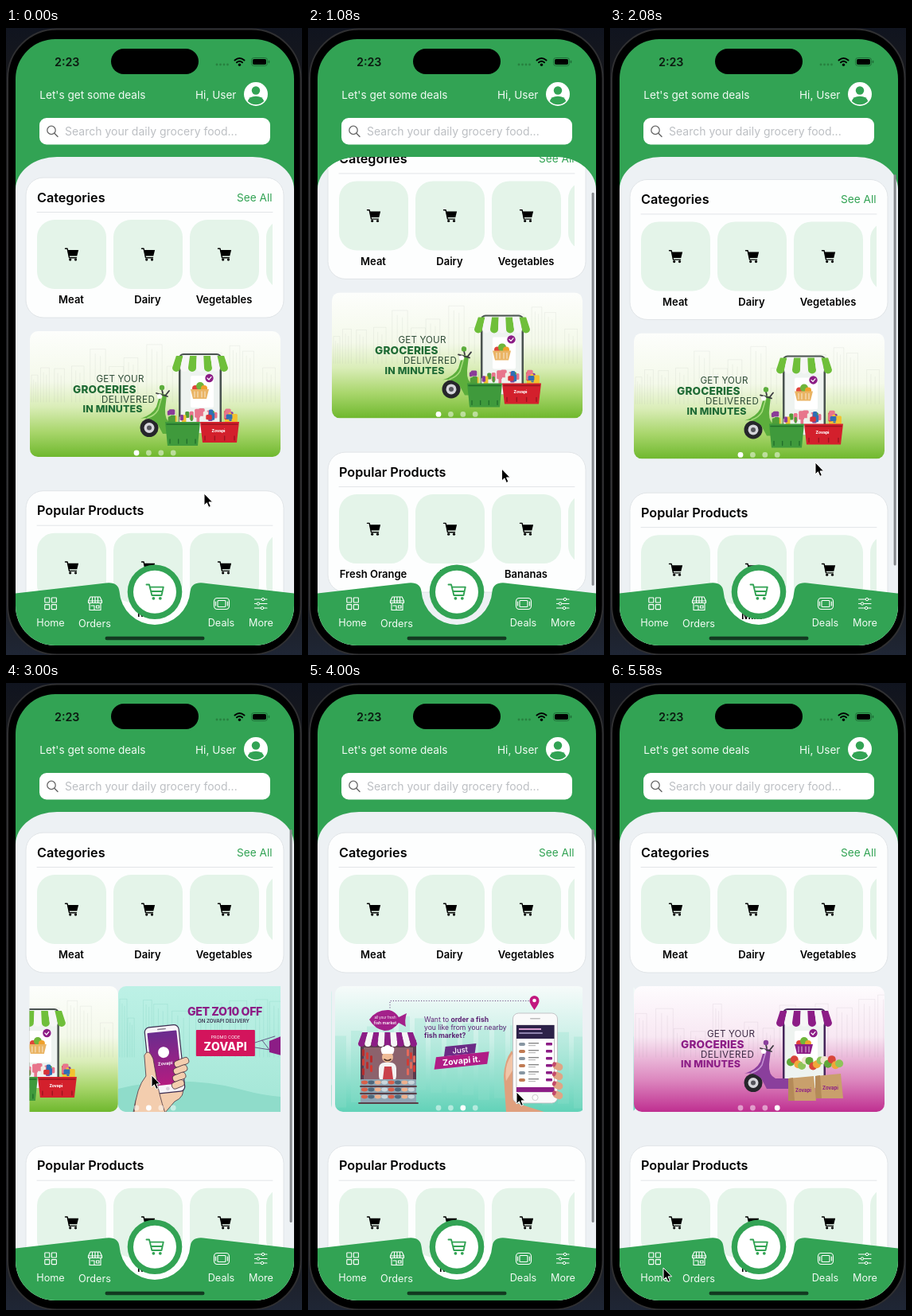
These frames come from a looping animation (372x788 px, 5.66 s). An HTML page:

```html
<!DOCTYPE html>
<html lang="en">
<head>
<meta charset="utf-8">
<title>Grocery app</title>
<style>
html, body { margin: 0; width: 100%; height: 100%; overflow: hidden; background: #000; }
svg { display: block; width: 372px; height: 788px; }
text { font-family: Inter, sans-serif; white-space: pre; }
</style>
</head>
<body>
<svg id="stage" viewBox="0 0 372 788"></svg>
<script>
const GREEN = '#32a354', PURPLE = '#8c1d86', PINK = '#c2187f';
const LOOP = 5660, STEP = 1000 / 12;

let seed = 7;
const rnd = () => (seed = seed * 16807 % 2147483647) / 2147483647;
const range = (n, f) => Array.from({ length: n }, (_, i) => f(i)).join('');

const text = (x, y, size, str, attr = '') => `<text x="${x}" y="${y}" font-size="${size}" ${attr}>${str}</text>`;
const mid = (x, y, size, str, attr = '') => text(x, y, size, str, 'text-anchor="middle" ' + attr);
const rect = (x, y, w, h, r, fill, attr = '') => `<rect x="${x}" y="${y}" width="${w}" height="${h}" rx="${r}" fill="${fill}" ${attr}/>`;
const dot = (x, y, r, fill, attr = '') => `<circle cx="${x}" cy="${y}" r="${r}" fill="${fill}" ${attr}/>`;
const path = (d, fill, attr = '') => `<path d="${d}" fill="${fill}" ${attr}/>`;
const line = (d, color, w = 1, attr = '') => path(d, 'none', `stroke="${color}" stroke-width="${w}" stroke-linecap="round" stroke-linejoin="round" ${attr}`);
const at = (x, y, body, attr = '') => `<g transform="translate(${x} ${y})" ${attr}>${body}</g>`;
const gradient = (id, ...stops) => `<linearGradient id="${id}" x2="0" y2="1">${stops.map(([o, c]) => `<stop offset="${o}" stop-color="${c}"/>`).join('')}</linearGradient>`;

// ---- product cards
const cart = line('M-8 -7.2H-5.4L-3 4.2H6', '#000', 1.4) + path('M-5.2 -5.4H8.6L6.8 2H-3.6z', '#000') +
  dot(-1.8, 6.6, 1.6, '#000') + dot(5, 6.6, 1.6, '#000');

function card(y, title, labels, extra = '') {
  return at(0, y,
    rect(25, 0, 324, 176, 22, '#fdfefe', 'stroke="#e0e4e7"') +
    text(39, 30.8, 16.2, title, 'font-weight="600"') + extra +
    line('M39 43.5H335', '#e2e5e8') +
    `<g clip-path="url(#row)">` + range(4, i => at(82.5 + 96 * i, 0,
      rect(-43.5, 53, 87, 87, 22, '#e4f4e9') + at(0, 96.5, cart) +
      mid(-.5, 158.4, 13, labels[i] || '', 'font-weight="600"'))) + '</g>');
}

// ---- banner parts
function skyline(color, opacity) {
  let d = '';
  for (let x = 32; x < 340;) {
    const w = 8 + rnd() * 14, top = 392 + rnd() * 48;
    d += `M${x} 470V${top}h${w}V470M${x + w / 3} 470V${top + 6}M${x + w / 1.5} 470V${top + 9}`;
    x += w + rnd() * 12;
  }
  return line(d, color, .6, `opacity="${opacity}"`);
}

function awning(x, y, w, h, n, color) {
  const s = w / n, cx = x + w / 2, pull = v => cx + (v - cx) * .86;
  return range(n, i => {
    const a = x + i * s, b = a + s;
    return path(`M${pull(a)} ${y}H${pull(b)}L${b} ${y + h}A${s / 2} ${s / 2} 0 0 1 ${a} ${y + h}z`, i % 2 ? '#f6f6f6' : color);
  });
}

const shop = (color, dark) =>
  rect(217, 409, 54, 100, 6, dark) + rect(219.5, 411, 49, 98, 4, '#eef3f0') +
  awning(209, 412, 70, 15, 7, color) +
  rect(232, 437, 29, 40, 2, '#fff') +
  dot(238, 453, 4, '#e0453a') + dot(244, 450, 5, '#6fb53a') + dot(249, 453, 4, '#f0a02c') +
  path('M232 454H255L252 466H235z', color == PURPLE ? PURPLE : '#eab464') +
  line('M237 457V464M241 457V464M246 457V464M250 457V464', '#fff', .7) +
  dot(255.5, 440, 5.2, PURPLE) + line('M253 440L255 442L258 438.4', '#fff', 1.2);

const scooter = (color, light) =>
  dot(180, 502.5, 11.5, '#26262b') + dot(180, 502.5, 6.5, '#d5d5da') + dot(180, 502.5, 3, '#55555c') +
  path('M194 459L189 476Q184 486 169 491Q180 488 190 497L197 510H226V497H208Q199 493 200 479L202 461z', color) +
  line('M196 463L191 480Q187 487 178 490', light, 1.6) +
  line('M189 459L203 463M197 459L195 450M201 461L205 456', '#3b3b40', 1.8) +
  dot(196, 452, 3.2, color) + dot(193, 463, 3, '#fff');

const groceries = (x0, x1, y) => range(34, () => rect(x0 + rnd() * (x1 - x0), y + rnd() * 11, 3 + rnd() * 5, 6 + rnd() * 6, 1.5,
  ['#d8343a', '#f2c230', '#f1ece4', '#4f9e38', '#8a3c98', '#2f6fb5', '#e8758c'][Math.floor(rnd() * 7)]));

const crate = (x, y, w, h, color, slot) =>
  path(`M${x} ${y}h${w}l-3 ${h}h${6 - w}z`, color) +
  line(`M${x + 2} ${y + 3}h${w - 4}`, slot, 1.6) +
  range(4, i => line(`M${x + 6 + i * (w - 12) / 3} ${y + h - 8}v5`, slot, 1.4));

const slogan = (xs, thin, bold) => [['GET YOUR', 11.6], ['GROCERIES', 13.6], ['DELIVERED', 11.6], ['IN MINUTES', 12.4]].map(([s, size], i) =>
  text(xs[i], [444.8, 458.6, 470.6, 483.3][i], size, s,
    `fill="${i % 2 ? bold : thin}" font-weight="${i % 2 ? 800 : 400}" letter-spacing="${i == 2 ? .5 : .15}"`)).join('');

const page = (x, fill, body, dx = 0) => at(x, 0,
  `<g clip-path="url(#page)">${rect(30, 381, 315, 158, 0, fill)}${at(dx, 0, body)}</g>`);

const bag = (x, y) => path(`M${x} ${y}l32 -3l3 31h-35z`, '#c9a06c') + path(`M${x} ${y}l6 -1l2 29h-8z`, '#b48a58') +
  mid(x + 19, y + 17, 6, 'Zovapi', `font-weight="700" fill="${PURPLE}"`);

const greenPage = () => page(0, 'url(#lime)',
  skyline('#9aa59a', .2) + shop('#6fbf3a', '#4a5350') + slogan([113.5, 84, 120, 96.5], '#2c4a35', '#1f6b35') +
  scooter('#5cae3c', '#a6dc7c') + groceries(202, 284, 478) +
  crate(200, 495, 44, 30, '#3f9a3c', '#226f2b') + crate(244, 495, 49, 26, '#d3202c', '#9c1420') +
  mid(267, 507.5, 5, 'Zovapi', 'font-weight="800" fill="#fff"'));

const purplePage = () => page(945, 'url(#magenta)',
  skyline('#a096a4', .22) + shop(PURPLE, '#45265a') + slogan([122, 89, 114, 89], '#3d2b45', PURPLE) +
  scooter('#8a3f9c', '#c48fd2') +
  range(14, i => dot(227 + i * 4.7, 473 + rnd() * 9, 5, ['#5fa83a', '#d8453a', '#f0a83a', '#8fc45a', '#efe6cf'][i % 5])) +
  bag(258, 494) + bag(224, 497));

const outline = 'stroke="#4a3440" stroke-width=".8"';
const codePage = () => page(315, 'url(#mint)',
  at(111, 0, skyline('#4fb3a2', .25)) +
  path('M141 510Q220 490 300 512T470 500V539H141z', '#8fdcca') +
  // palm, device, then the fingers in front
  path('M160 540Q164 512 177 500L176 470Q180 462 186 474L200 512L222 506Q226 520 212 526L200 540z', '#f3cdae', outline) +
  `<g transform="rotate(-6 200 472)">` + rect(178, 431, 43, 84, 6, '#f7f3f8', 'stroke="#3c2d50" stroke-width="1.2"') +
  rect(181, 438, 37, 67, 1, 'url(#violet)') + dot(199.5, 510, 2.4, '#d8d2dc') + rect(194, 434, 11, 1.4, .7, '#8a8290') +
  dot(199, 464, 7, '#fff') + mid(199.5, 480, 5.6, 'Zovapi', 'font-weight="700" fill="#fff"') + '</g>' +
  range(4, i => `<g transform="rotate(-22 ${222 - i} ${476 + i * 9})">` +
    rect(211 - i, 472 + i * 9, 19 - i, 8.5, 4, '#f3cdae', outline) + '</g>') +
  path('M161 540Q164 508 176 494L174 468Q179 458 185 472L190 500Q192 516 200 540z', '#f3cdae', outline) +
  text(228, 418, 14.2, 'GET ZO10 OFF', `font-weight="800" fill="${PURPLE}" letter-spacing="-.4"`) +
  text(241, 427.3, 6.2, 'ON ZOVAPI DELIVERY', 'font-weight="600" fill="#3a3350"') +
  rect(239, 436, 74, 33, 1, '#d3145c') +
  mid(276, 447, 5.4, 'PROMO CODE', 'fill="#fff"') +
  mid(276, 461.5, 14, 'ZOVAPI', 'font-weight="800" fill="#fff" letter-spacing=".3"') +
  line('M313 452L338 444M313 458L338 462M322 449L332 462', '#5d4b7c', .9) +
  path('M331 450L346 444V468L331 464z', PURPLE) + rect(346, 444, 46, 32, 3, PURPLE) +
  path('M392 452h16l10 12v12h-26z', '#b45aae') + dot(360, 478, 6, '#37303f') + dot(404, 478, 6, '#37303f'),
  -111);

const stall =
  rect(66, 448, 70, 80, 2, '#5a3a4c') + rect(70, 458, 62, 40, 0, '#8c626c') +
  awning(63, 439, 74, 14, 9, PURPLE) +
  range(7, i => rect(68 + (i % 3) * 5, 460 + i * 4, 3, 9, 1.5, i % 2 ? '#d23b34' : '#b82c2c') +
    rect(124 + (i % 3) * 4, 460 + i * 4, 3, 9, 1.5, i % 2 ? '#d23b34' : '#e4695a')) +
  rect(89, 477, 22, 24, 7, '#f4f2f2') + dot(100, 470, 7, '#f0bd98') + path('M93 466q-4 -9 3 -9q4 -4 8 0q7 0 3 9z', '#fff') +
  line('M96 473q4 3 8 0', '#4a2d25', 1.6) + path('M96 482h9l2 16h-13z', '#c9404a') +
  rect(66, 498, 70, 30, 1, '#8ea5b4') +
  range(24, i => `<ellipse cx="${71 + i % 8 * 8.4}" cy="${502 + Math.floor(i / 8) * 9}" rx="4" ry="2.4" fill="${['#d9604a', '#c9d6dc', '#eeb08c', '#50697c'][i * 7 % 4]}"/>`) +
  line('M66 507H136M66 516H136M64 528H138', '#5a3f48', 1.8);

const handset =
  path('M249 540L246 494Q247 474 256 462L262 474V528L300 540z', '#dfa07e') +
  path('M249 500Q246 480 257 466L260 482z', '#f1c5a8') +
  rect(257.5, 415, 56, 113, 7, '#fafafa', 'stroke="#b9b6bc" stroke-width=".8"') +
  rect(262, 430, 47.5, 84, 0, '#fff', 'stroke="#888" stroke-width=".5"') +
  rect(262, 430, 47.5, 17, 0, '#2c2148') + rect(265, 434, 28, 2, 0, '#d9a0d2') + rect(265, 439, 30, 2, 1, '#8d82ad') +
  rect(262, 508, 47.5, 6, 0, PURPLE) +
  range(6, i => rect(265, 452 + i * 9, 8, 4, 2, i % 2 ? '#c07a52' : '#8796a2') + rect(277, 452 + i * 9, 13, 1.4, 0, '#888') +
    rect(277, 455 + i * 9, 9, 1.2, 0, '#bbb') + rect(299, 452 + i * 9, 8, 3.6, 1, PURPLE)) +
  dot(285.5, 521, 3.6, '#fff', 'stroke="#ccc"') + rect(279, 421, 13, 1.6, .8, '#bbb') +
  range(4, i => `<g transform="rotate(24 311 ${480 + i * 12})">` + rect(308, 476 + i * 12, 13, 9, 4.5, '#e0a585') +
    rect(307, 477 + i * 12, 4.5, 6, 2, '#c24a6c') + '</g>');

const fishPage = () => page(634, 'url(#sea)',
  range(16, i => rect(34 + i * 20, 405 + rnd() * 40, 14, 90, 0, '#8fdccb', 'opacity=".3"')) +
  line('M103 408V399.5H284', '#5d3b74', 1.1, 'stroke-dasharray=".2 3"') +
  path('M284.5 411Q278 402 278.5 399A6 6 0 0 1 290.5 399Q291 402 284.5 411z', PINK) + dot(284.5, 399, 2.3, '#fff') +
  path('M77 423Q86 410 102 411Q110 413 114 420L124 415Q121 424 123 432L114 427Q107 437 96 437Q84 435 77 423z', '#a3208a') +
  mid(97, 421.5, 4.4, 'all your fresh', 'fill="#fff"') + mid(97, 428.5, 5.2, 'fish market', 'fill="#fff" font-weight="600"') +
  stall + handset +
  text(146, 426, 8.6, 'Want to <tspan font-weight="700">order a fish</tspan>', 'fill="#5a1f72"') +
  text(146, 436, 8.6, 'you like from your nearby', 'fill="#5a1f72"') +
  text(146, 446, 8.6, 'fish market?', 'fill="#5a1f72" font-weight="700"') +
  `<g transform="rotate(-6 193 469)">` +
  path('M174 455H213L210 467H171z', '#6b2a86') + mid(192, 464.6, 9.6, 'Just', 'fill="#fff" font-weight="500"') +
  path('M161 467H228L224 482H157z', '#b01c86') + mid(192.5, 478.4, 10.6, 'Zovapi it.', 'fill="#fff" font-weight="700"') + '</g>',
  -4);

// ---- fixed chrome
const header =
  text(61, 47.6, 14.3, '2:23', 'font-weight="600" fill="#0b1a10"') + rect(132, 26, 110, 32, 16, '#000') +
  range(4, i => dot(265 + i * 4.5, 46, 1.4, '#27813f')) +
  line('M287.5 40.5Q293.5 35.5 299.5 40.5M290 43.3Q293.5 40.3 297 43.3', '#000', 2) + dot(293.5, 46.2, 1.7, '#000') +
  rect(308.5, 37.5, 20, 10, 3, 'none', 'stroke="#1f6e38"') + rect(310, 39, 17, 7, 1.8, '#000') + rect(329.7, 40.7, 1.6, 3.6, .8, '#1f6e38') +
  text(42.3, 88.6, 13.6, "Let's get some deals", 'fill="#f2fbf4"') + text(238, 88.6, 13.6, 'Hi, User', 'fill="#f2fbf4"') +
  dot(314, 83, 15, '#fff') + dot(314, 78.5, 5.2, GREEN) + path('M303.8 92Q305.5 85.8 314 85.8T324.2 92Q320 96.2 314 96.2T303.8 92z', GREEN) +
  rect(42, 113, 290, 33.5, 9, '#fff') +
  dot(57, 128.4, 5.2, 'none', 'stroke="#666" stroke-width="1.3"') + line('M61 132.4L65 136.6', '#666', 1.4) +
  text(74, 135.3, 14, 'Search your daily grocery food...', 'fill="#bcbfc3"');

const tabIcons =
  range(4, i => rect(48.8 + i % 2 * 8.6, 716 + (i >> 1) * 8.6, 6, 6, .6, 'none', 'stroke="#fff" stroke-width="1.1"')) +
  line('M106 715H118L120.5 720V722.5H103.5V720zM105 723V731.5H119V723M107 726H111V731M113.5 726H117V729H113.5zM103.5 720H120.5M108.5 715V722M112 715V722M115.5 715V722', '#fff', 1.1) +
  rect(261.5, 716.5, 19, 14, 4, 'none', 'stroke="#fff" stroke-width="1.1"') + rect(266, 719.5, 10, 8, 1, 'none', 'stroke="#fff" stroke-width="1.1"') +
  line('M263.5 721V726M278.5 721V726', '#fff', 1.2) +
  line('M312.5 718H328M312.5 723.5H328M312.5 729H328', '#fff', 1.1) +
  [[323, 718], [317, 723.5], [322, 729]].map(([x, y]) => dot(x, y, 1.7, GREEN, 'stroke="#fff"')).join('');

const tabBar =
  path('M12 710.5L126 697.5Q141 696 142.5 708A44.6 45 0 0 0 231.5 708Q233 696 248 697.5L362 710.5V778H12z', GREEN) +
  dot(187, 708.7, 34.3, GREEN) + dot(187, 708.7, 27, '#fff') +
  line('M176.5 699.5H180L183.4 713H195.5L197.8 702.6H181M182.4 708H196', GREEN, 1.9) +
  dot(185.4, 716.8, 1.9, GREEN) + dot(193.8, 716.8, 1.9, GREEN) + tabIcons +
  [['Home', 56, 751.5], ['Orders', 111.5, 752.5], ['Deals', 270.5, 751.5], ['More', 320.5, 751.5]]
    .map(([s, x, y]) => mid(x, y, 12.7, s, 'fill="#f2fbf4"')).join('') +
  rect(124.5, 764.8, 125, 4.4, 2.2, '#123a20');

const pages = greenPage() + codePage() + fishPage() + purplePage();

stage.innerHTML = `<defs>
  ${gradient('wall', [0, '#10141f'], [.1, '#1a1a1c'], [.9, '#1b1c20'], [1, '#1f2635'])}
  ${gradient('lime', [0, '#fdfefc'], [.4, '#f4f9ea'], [.6, '#daedb8'], [.8, '#a9d66c'], [1, '#6fb82e'])}
  ${gradient('magenta', [0, '#fefcfe'], [.4, '#f8e8f3'], [.75, '#dc86be'], [1, '#bf2f90'])}
  ${gradient('mint', [0, '#bdf1e6'], [1, '#a3e6d6'])}
  ${gradient('sea', [0, '#f6fbfa'], [.45, '#c8efe6'], [1, '#62d2b8'])}
  ${gradient('violet', [0, '#6a2c8e'], [1, '#b41c80'])}
  <clipPath id="screen"><rect x="12" y="14" width="350" height="762" rx="50"/></clipPath>
  <clipPath id="panel"><path d="M12 788V203A52 41 0 0 1 64 162H310A52 41 0 0 1 362 203V788z"/></clipPath>
  <clipPath id="row"><rect x="39" y="44" width="296" height="132"/></clipPath>
  <clipPath id="view"><rect x="29.5" y="381" width="315.5" height="158"/></clipPath>
  <clipPath id="page"><rect x="30" y="381" width="315" height="158" rx="10"/></clipPath>
</defs>
${rect(0, 0, 372, 788, 0, 'url(#wall)')}
${rect(2, 1.5, 368.5, 786, 62, '#000', 'stroke="#303032" stroke-width="2"')}
<g clip-path="url(#screen)">
  ${rect(12, 14, 350, 762, 0, GREEN)}
  <g clip-path="url(#panel)">
    ${rect(12, 160, 350, 628, 0, '#edf1f4')}
    <g id="content">
      ${card(188, 'Categories', ['Meat', 'Dairy', 'Vegetables'], text(290, 30, 13.7, 'See All', `fill="${GREEN}"`))}
      <g clip-path="url(#view)"><g id="slides">${pages}</g></g>
      <g id="dots">${range(4, i => dot(164 + 15.4 * i, 534, 3.4, '#fff'))}</g>
      ${card(581.7, 'Popular Products', ['Fresh Orange', 'Milk', 'Bananas', 'Strawberry'])}
    </g>
  </g>
  ${header}
  ${rect(356.6, 184, 3, 494, 1.5, '#84878b', 'id="bar"')}
  ${tabBar}
</g>
<g id="cursor">${path('M0 0V15L3.4 11.8L5.8 17.4L8.4 16.3L6 10.9H10.6z', '#000', 'stroke="#fff" stroke-width="1"')}</g>`;

// ---- motion: rows of [time, values...], eased between
const $ = id => document.getElementById(id);
const smooth = x => x * x * (3 - 2 * x);

function track(rows, t) {
  const i = rows.findIndex(r => r[0] > t);
  if (i < 0) return rows[rows.length - 1].slice(1);
  if (!i) return rows[0].slice(1);
  const a = rows[i - 1], b = rows[i], k = smooth((t - a[0]) / (b[0] - a[0]));
  return a.slice(1).map((v, j) => v + (b[j + 1] - v) * k);
}

const POINTER = [[0, 249, 585], [80, 248, 596], [650, 244, 420], [700, 244, 420], [1500, 243, 706], [1620, 243, 710],
  [2080, 258, 546], [2560, 300, 490], [3000, 183, 493], [3180, 180, 497], [3480, 300, 505], [3760, 186, 511],
  [4000, 262, 514], [4200, 300, 516], [4550, 160, 512], [4750, 142, 530], [5250, 108, 640], [5580, 67, 735]];
const DRAG = [[60, 0], [650, -136.5], [700, -136.5], [1500, 51], [1600, 53]];
const SLIDE = [[2580, 0], [3280, 1], [3500, 1], [4000, 2], [4220, 2], [4850, 3]];

const scrollAt = t => t < 1600 ? track(DRAG, t)[0] : t < 2500 ? 53 * Math.exp((1600 - t) / 157) : 0;

function draw(t) {
  const s = scrollAt(t), [p] = track(SLIDE, t), [x, y] = track(POINTER, t);
  $('content').setAttribute('transform', `translate(0 ${s})`);
  $('slides').setAttribute('transform', `translate(${-315 * p} 0)`);
  [...$('dots').children].forEach((d, i) => d.setAttribute('opacity', i == Math.round(p) ? 1 : .5));
  $('cursor').setAttribute('transform', `translate(${x} ${y})`);

  // the indicator shrinks when pulled past either end
  const up = Math.max(0, -s), over = Math.max(0, up - 68);
  const top = 184 + Math.min(32, up * .47) + over;
  const bottom = 678 + Math.min(32, up * .47) - Math.max(0, s);
  $('bar').setAttribute('y', top);
  $('bar').setAttribute('height', bottom - top);
  $('bar').setAttribute('opacity', t < 80 ? 0 : Math.max(0, Math.min(1, (5560 - t) / 250)));
}

function tick() {
  const t = performance.now() % LOOP;
  draw(Math.floor((t + 4) / STEP) * STEP);
  requestAnimationFrame(tick);
}
tick();
</script>
</body>
</html>
```
